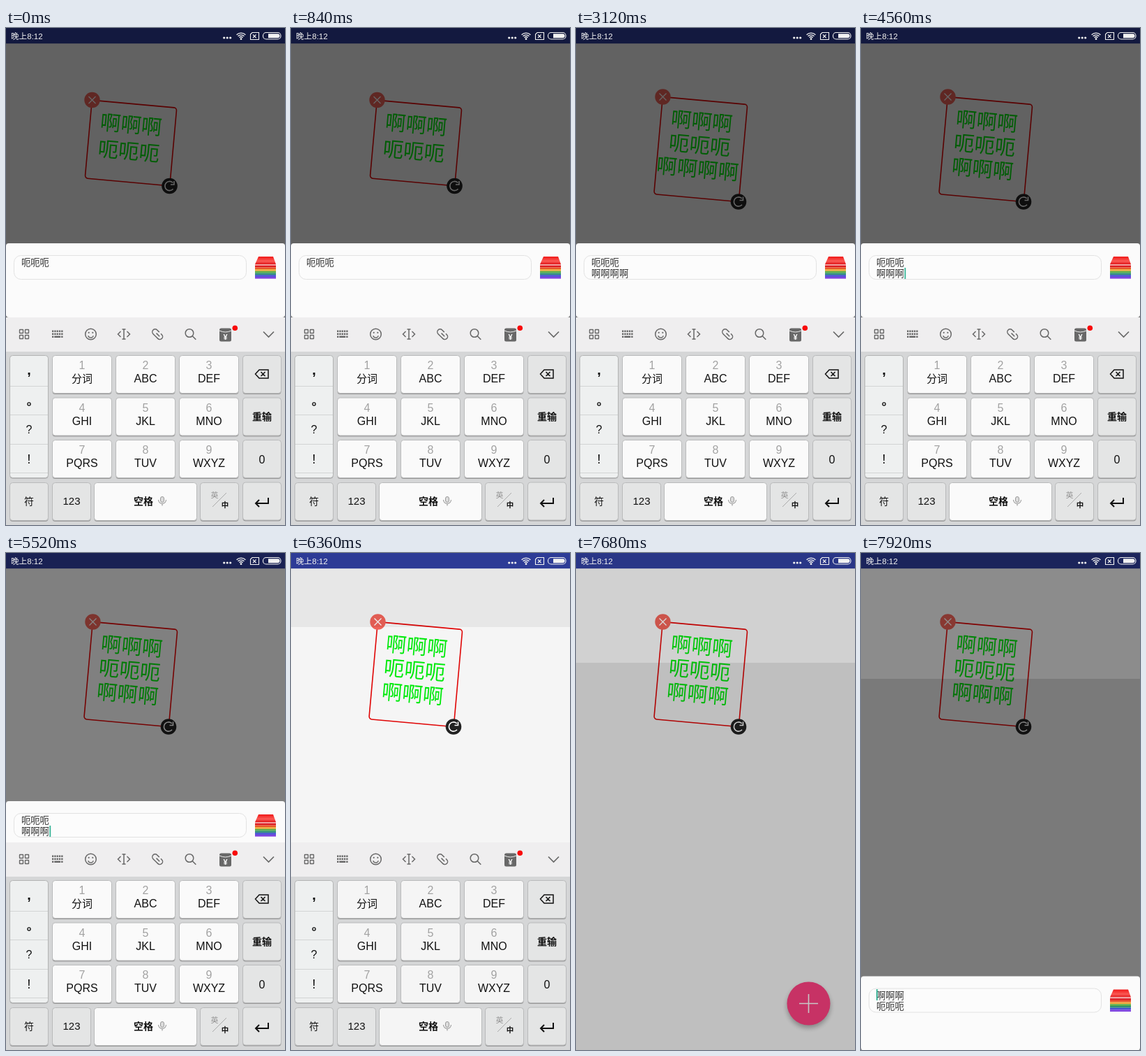
Recreate the animation shown at these times as an HTML page with a canvas. Size 400x711 px, loop 8000 ms.

```html
<!DOCTYPE html>
<html lang="zh">
<head>
<meta charset="utf-8">
<style>
html, body { margin: 0; width: 100%; height: 100%; overflow: hidden; background: #f5f5f5; }
canvas { display: block; width: 400px; height: 711px; }
</style>
</head>
<body>
<canvas id="stage" width="400" height="711"></canvas>
<script>
const c = document.getElementById('stage').getContext('2d');
const LOOP = 8000, STEP = 120;
const FONT = '"Liberation Sans", "Noto Sans CJK SC", "Noto Sans CJK", sans-serif';
const clamp = x => Math.max(0, Math.min(1, x));
const within = (t, a, b) => t >= a && t < b;

function rect(x, y, w, h, fill) { c.fillStyle = fill; c.fillRect(x, y, w, h); }
function box(x, y, w, h, r, fill, stroke, lw = 1) {
  c.beginPath(); c.roundRect(x, y, w, h, r);
  if (fill) { c.fillStyle = fill; c.fill(); }
  if (stroke) { c.strokeStyle = stroke; c.lineWidth = lw; c.stroke(); }
}
function disc(x, y, r, fill) { c.beginPath(); c.arc(x, y, r, 0, 7); c.fillStyle = fill; c.fill(); }
function arc(x, y, r, a, b, stroke, lw) {
  c.beginPath(); c.arc(x, y, r, a, b); c.strokeStyle = stroke; c.lineWidth = lw; c.stroke();
}
function path(d, stroke, lw, fill) {
  const p = new Path2D(d);
  if (fill) { c.fillStyle = fill; c.fill(p); }
  if (stroke) { c.strokeStyle = stroke; c.lineWidth = lw; c.stroke(p); }
}
// Text with its visual middle at y
function text(s, x, y, size, color = '#111', align = 'center', weight = 400) {
  c.font = `${weight} ${size}px ${FONT}`;
  c.textAlign = align; c.fillStyle = color;
  c.fillText(s, x, y + size * .36);
}

// Typing: composition, side column and candidates
const typing = [
  { from: 1440, until: 1800, word: 'a', side: ['a', 'b', 'c', '2'], picks: ['啊', '不', '吧', '才', '从', '本', '把', '比'] },
  { from: 1800, until: 2280, word: 'ba', side: ['ba', 'ca', 'a', 'b'], picks: ['把', '八', '吧', '爸', '⑧', '擦', 'bb', '啊'] },
  { from: 2280, until: 2520, word: "a'a'a", side: ['ba', 'ca', 'a', 'b'], picks: ['啊啊啊', '', '爸爸', '', '八', '把', '吧', '啊'] },
  { from: 2520, until: 2880, word: "a'a'a'a", side: ['ba', 'ca', 'a', 'b'], picks: ['啊啊啊啊', '', '', '爸爸', '', '八', '把', '啊'] }
];
const thirdLine = t => t < 2880 ? '' : t < 3840 ? '啊啊啊啊' : '啊啊啊';
const caretOn = t => [[360, 840], [3360, 4800], [5160, 6000], [7920, LOOP]].some(([a, b]) => within(t, a, b));

function dimAt(t) {
  if (t < 5520) return .6;
  if (t < 7000) return .48 * clamp((6360 - t) / 840);
  return clamp(.22 + (t - 7680) * .28 / 240);
}

function sticker(t) {
  const extra = thirdLine(t), tall = extra !== '';
  const h = tall ? 139.7 : 112, pitch = tall ? 34.2 : 38;
  c.save();
  c.translate(tall ? 124.3 : 123.3, tall ? 98.5 : 103.3);
  c.rotate(.09);
  box(0, 0, 122, h, 4, null, '#e00505', 1.6);
  ['啊啊啊', '呃呃呃', extra].forEach((s, i) => text(s, 59, 30 + i * pitch, 29.5, '#00ea0c'));
  c.restore();

  const [x, y] = tall ? [124.5, 98.5] : [123.5, 103];
  disc(x, y, 11.2, '#ef6358');
  path(`M${x - 5} ${y - 5}l10 10m0-10l-10 10`, '#fff', 1.3);
  const [u, v] = tall ? [233, 248.5] : [234.5, 226];
  disc(u, v, 11.3, '#222');
  arc(u, v, 6.6, .7, 5.5, '#fff', 1.6);
  path(`M${u + 6.5} ${v - 7}v5h-5`, '#fff', 1.6);
}

function fab(t) {
  const pressed = within(t, 7200, 7560);
  c.save();
  c.shadowColor = 'rgba(0,0,0,.3)'; c.shadowBlur = pressed ? 12 : 7; c.shadowOffsetY = 4;
  disc(333.5, 644.5, 31, '#ff4081');
  c.restore();
  if (pressed) disc(333.5, 644.5, 12 + (t - 7200) / 13, 'rgba(255,255,255,.15)');
  path('M320 644.5h27m-13.5-13.5v27', '#fff', 1.6);
}

function dim(t) {
  const tear = t < 6360 ? 0 : t < 7680 ? 106 + (t - 6360) * 51 / 1320 : 157 + (t - 7680) * 23 / 240;
  const lag = t < 7000 ? 105 : 60;
  if (within(t, 7000, 7680)) return;
  rect(0, 0, 400, tear, `rgba(0,0,0,${dimAt(t - lag)})`);
  rect(0, tear, 400, 711 - tear, `rgba(0,0,0,${dimAt(t)})`);
}

function dialog(t) {
  const opening = t >= 7680;
  let y = 308;
  if (opening) y = 605.5 + 106 * (1 - clamp((t - 7680) / 240)) ** 2;
  else if (t >= 5520) y = 355 + (t - 5520) * .25;
  if (y >= (opening ? 711 : 414)) return;
  c.save();
  if (!opening) { c.beginPath(); c.rect(0, 0, 400, 414); c.clip(); }
  c.translate(0, y);
  box(0, 0, 400, 106, 4, '#fbfbfb');
  box(11.5, 17.5, 333, 34, 10, '#fcfcfc', '#e2e2e2');
  const lines = opening ? ['啊啊啊', '呃呃呃'] : ['呃呃呃', thirdLine(t)];
  lines.forEach((s, i) => text(s, 22, 27.7 + i * 15.4, 13.3, '#333', 'left'));
  if (caretOn(t)) {
    const x = opening ? 22 : 22.5 + 13.3 * lines[1].length;
    rect(x, opening ? 18.5 : 35, 1.8, 16, '#35b597');
  }
  // Striped eraser
  const top = c.createLinearGradient(0, 19, 0, 30);
  top.addColorStop(0, '#f01818'); top.addColorStop(.6, '#fb5a55'); top.addColorStop(1, '#e01518');
  path('M362 19h21l4 11h-30z', null, 0, top);
  ['#f3aaaa', '#dc1c22', '#e8552a', '#f0a83a', '#58ae48', '#2f8f78', '#4350d0', '#7d42e0']
    .forEach((color, i) => rect(357, i ? 29 + i * 2.7 : 30, 30, i ? 2.7 : 1.7, color));
  c.restore();
}

function key(x, y, w, fill) {
  box(x + .5, y + 1.5, w - 1, 54.5, 4, '#999');
  box(x + .5, y + .5, w - 1, 54, 4, fill, '#b9babb');
}

function toolbar() {
  const ink = '#686868';
  for (const x of [19.5, 27.5]) for (const y of [431.5, 439.5]) box(x, y, 5, 5, .5, null, ink, 1.4);
  for (let i = 0; i < 5; i++) for (let j = 0; j < 2; j++) rect(66 + i * 3.3, 432.5 + j * 4, 2.3, 2.5, ink);
  rect(66, 440.5, 2.3, 2.5, ink); rect(69.3, 440.5, 8.9, 2.5, ink); rect(79.2, 440.5, 2.3, 2.5, ink);
  arc(121.5, 438, 7.8, 0, 7, ink, 1.5);
  arc(121.5, 439, 4, .3, 2.84, ink, 1.4);
  disc(118.7, 435.8, 1.1, ink); disc(124.3, 435.8, 1.1, ink);
  path('M169 431v14m-2.5-14h5m-5 14h5M164.5 434l-4 4 4 4m9-8l4 4-4 4', ink, 1.5);
  c.save();
  c.translate(217, 438); c.rotate(.78);
  path('M2 4H-4.5a4 4 0 0 1 0-8H0M-2 0H4.5M2 4h3a4 4 0 0 0 0-8H3', ink, 1.5);
  c.restore();
  arc(263, 436.5, 5.8, 0, 7, ink, 1.5);
  path('M267.3 440.8l5 5', ink, 1.6);
  box(306, 429.5, 17, 19, 2.5, ink);
  path('M306 433q8.5 4 17 0', '#eee', 1);
  text('¥', 314.5, 442, 11, '#fff', 'center', 700);
  disc(328.3, 429.3, 3.8, '#f80a0a');
  path('M369 434.5l7.5 7.5 7.5-7.5', ink, 1.7);
}

function candidates(state) {
  const xs = [31, 81, 125, 168, 211, 255, 299, 343];
  state.picks.forEach((s, i) => {
    if (i || s.length < 2) text(s, xs[i], 439, 20, i ? '#111' : '#2b9bcb');
    else text(s, 20, 439, 20, '#2b9bcb', 'left');
  });
  path('M371 435h11l-5.5 7z', null, 0, '#777');
  const w = state.word === 'ba' ? 25 : 16 + state.word.length * 8;
  c.save();
  c.beginPath(); c.rect(0, 394, w, 20); c.clip();
  rect(0, 394, w, 20, '#f0f0f0');
  text(state.word, 7, 404, 17, '#111', 'left');
  c.restore();
}

function keyboard(t) {
  const k = clamp((t - 6420) / 540);
  if (k === 1) return;
  const state = typing.find(s => within(t, s.from, s.until));
  c.save();
  c.translate(0, 297 * k * k);
  rect(0, 414, 400, 49, '#efeeef');
  rect(0, 463, 400, 248, '#d5d6d7');
  state ? candidates(state) : toolbar();

  // Side column
  box(5.5, 469.5, 55, 175, 4, '#999');
  box(5.5, 468.5, 55, 175, 4, '#eef0f0', '#b3b4b4');
  for (const y of [512.5, 553.5, 595.5, 636.5]) path(`M6 ${y}h54`, '#d2d4d4', 1);
  const rows = [492, 533.5, 575, 616.5];
  if (state) state.side.forEach((s, i) => text(s, 33, rows[i], 14.5));
  else {
    text(',', 33, 488.5, 20, '#111', 'center', 700);
    arc(33, 538, 2.1, 0, 7, '#111', 1.3);
    text('?', 33, 574, 16);
    text('!', 33, 616, 19);
  }

  const pressed = typing.some(s => within(t, s.from, s.from + STEP));
  const white = t < 6360 ? '#fafafa' : '#f5f5f5';
  ['分词', 'ABC', 'DEF', 'GHI', 'JKL', 'MNO', 'PQRS', 'TUV', 'WXYZ'].forEach((s, i) => {
    const x = 66 + i % 3 * 91, y = 468 + Math.floor(i / 3) * 60.5;
    key(x, y, 86, pressed && i === 1 ? '#d8d9da' : white);
    text(i + 1, x + 43, y + 14.5, 16, '#a2a2a2');
    text(s, x + 43, y + 33.5, i ? 16 : 15);
  });

  const grey = '#e4e5e5';
  const deleting = within(t, 3720, 3960);
  for (let i = 0; i < 4; i++) key(339, 468 + i * 60.5, 56, !i && deleting ? '#c8c9ca' : grey);
  path('M357.5 495l5.5-6h13v12h-13zM365.5 492l6 6m0-6l-6 6', '#111', 1.5);
  text('重输', 367, 556, 14, '#111', 'center', 700);
  text('0', 367, 617, 16);
  path('M376 672v8h-18m5-5l-5 5 5 5', '#111', 2);

  key(5, 650, 56, grey); text('符', 33, 677, 14);
  key(66, 650, 56, grey); text('123', 94, 677, 15);
  key(126, 650, 148, white); text('空格', 197, 677, 14, '#111', 'center', 700);
  box(221.5, 670.5, 5, 8, 2.5, '#ddd', '#999');
  path('M218.5 675a5.5 5.5 0 0 0 11 0M224 680.5v3', '#999', 1.1);
  key(278, 650, 56, grey);
  text('英', 299, 668, 10.5, '#888');
  text('中', 314, 682, 10.5, '#111', 'center', 700);
  path('M296 685l20-20', '#aaa', 1);
  c.restore();
}

function statusIcons() {
  const w = '#f2f2f2';
  text('晚上8:12', 7, 11.8, 11.6, w, 'left');
  for (const x of [312.7, 317.2, 321.7]) disc(x, 14, 1.6, w);
  for (const r of [3.5, 6.3, 9.1]) arc(337, 16.2, r, -2.35, -.79, w, 1.4);
  disc(337, 15.7, 1.4, w);
  path('M353 6.5h9.5v10h-12v-7.5zM354 9.5l4.5 4.5m0-4.5l-4.5 4.5', w, 1.1);
  box(368.5, 6.5, 25.5, 9.5, 4.5, null, w, 1.1);
  box(376, 8.2, 16.5, 6.1, [0, 3, 3, 0], w);
}

function draw() {
  const t = Math.floor(performance.now() % LOOP / STEP) * STEP;
  rect(0, 0, 400, 711, '#f5f5f5');
  rect(0, 0, 400, 22.2, '#303f9f');
  sticker(t);
  fab(t);
  dim(t);
  dialog(t);
  keyboard(t);
  statusIcons();
  requestAnimationFrame(draw);
}
draw();
</script>
</body>
</html>
```
